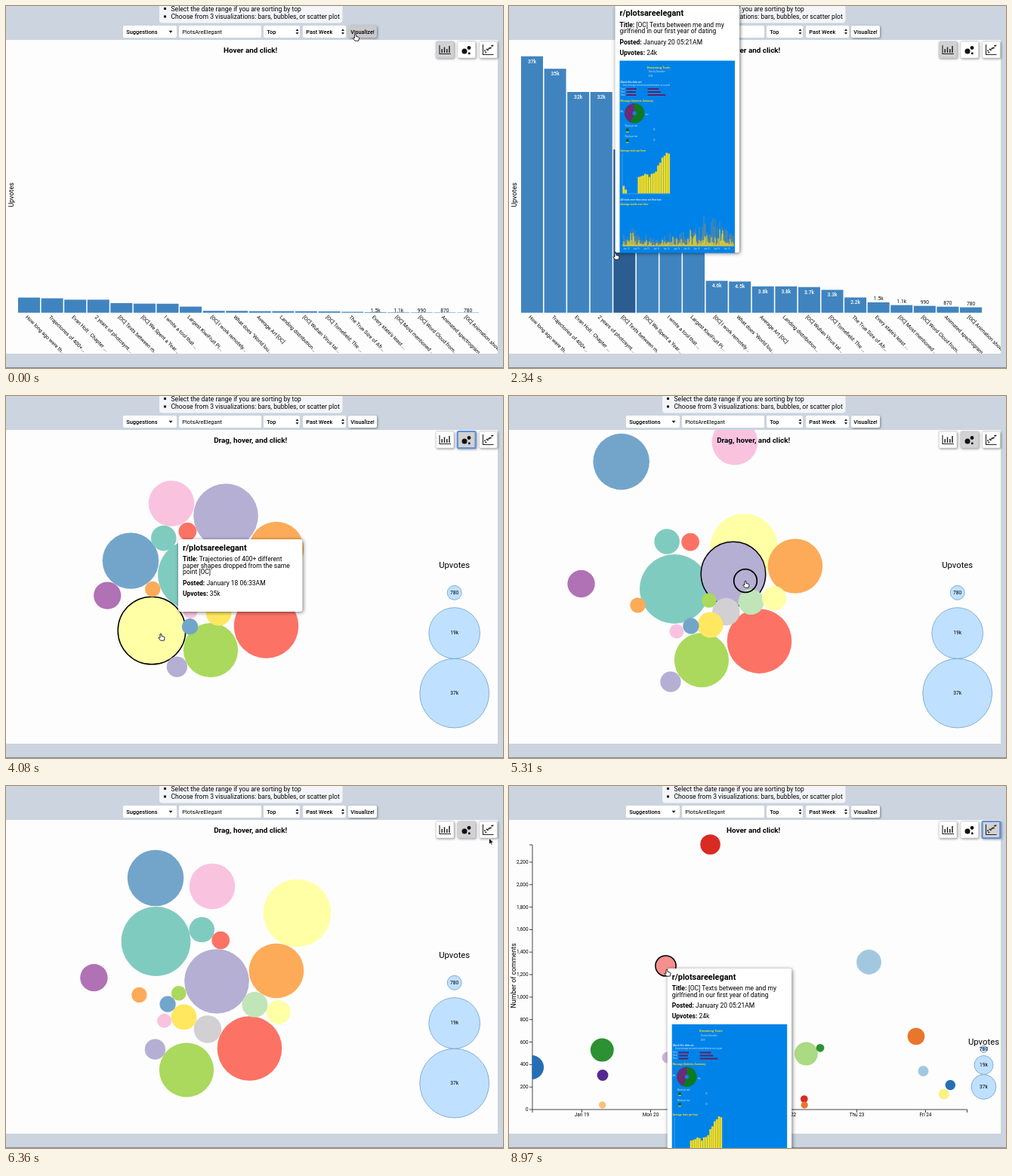
An HTML page for the animation above (9 s loop, 658x480 px).

```html
<!DOCTYPE html>
<html lang="en">
<head>
<meta charset="utf-8">
<title>Post visualizer</title>
<style>
  html, body { margin: 0; width: 100%; height: 100%; overflow: hidden; background: #cbd4df; }
  svg { display: block; width: 658px; height: 480px; font-family: Roboto, "Open Sans", sans-serif; }
  text { dominant-baseline: central; white-space: pre; }
  .bold { font-weight: 700; }
  .soft { filter: drop-shadow(1px 1px 1.5px rgba(0, 0, 0, .4)); }
  .tip { filter: drop-shadow(1px 1px 2.5px rgba(0, 0, 0, .55)); }
</style>
</head>
<body>
<svg id="stage" viewBox="0 0 658 480">
  <clipPath id="panel"><rect y="45" width="651" height="416"/></clipPath>
  <clipPath id="plot"><rect x="30.5" y="45" width="576" height="384"/></clipPath>
</svg>
<script>
const LOOP = 9000, TO_BUBBLES = 2850, TO_SCATTER = 6540, HOVER_LAG = 150;
const stage = document.getElementById('stage');

function el(tag, attrs, parent = stage, content) {
  const node = document.createElementNS('http://www.w3.org/2000/svg', tag);
  set(node, attrs);
  if (content !== undefined) node.textContent = content;
  parent.appendChild(node);
  return node;
}
function set(node, attrs) { for (const k in attrs) node.setAttribute(k, attrs[k]); }
const show = (node, on) => { node.style.display = on ? '' : 'none'; };
const group = (parent, attrs = {}) => el('g', attrs, parent);
const rect = (p, x, y, width, height, fill, more) => el('rect', { x, y, width, height, fill, ...more }, p);
const circle = (p, cx, cy, r, fill, more) => el('circle', { cx, cy, r, fill, ...more }, p);
const path = (p, d, more) => el('path', { d, fill: 'none', ...more }, p);
const text = (p, x, y, size, str, more) => el('text', { x, y, 'font-size': size, ...more }, p, str);
const mid = { 'text-anchor': 'middle' };
const midBold = { ...mid, class: 'bold' };

const clamp = v => Math.max(0, Math.min(1, v));
const mix = (a, b, p) => a + (b - a) * p;
const mixPoint = (a, b, p) => [mix(a[0], b[0], p), mix(a[1], b[1], p)];
const smooth = p => p * p * (3 - 2 * p);
const cubic = p => p < .5 ? 4 * p ** 3 : 1 - 4 * (1 - p) ** 3;
const span = (t, a, b) => clamp((t - a) / (b - a));
const within = (t, [a, b]) => t >= a && t < b;
const inBox = ([x, y], left, top, w, h) => x >= left && x < left + w && y >= top && y < top + h;
const noise = i => { const v = Math.sin(i * 12.9898) * 43758.5453; return v - Math.floor(v); };

// Page chrome
rect(stage, 0, 479, 658, 1, '#858b93');
rect(stage, 203, -10, 242.5, 32.5, '#f4f5f8', { rx: 4 });
['Select the date range if you are sorting by top',
 'Choose from 3 visualizations: bars, bubbles, or scatter plot'].forEach((line, i) => {
  rect(stage, 209, 2 + i * 10.5, 3, 3, '#111');
  text(stage, 218.5, 3.7 + i * 10.5, 8.6, line);
});
function field(x, w, label, weight = 500) {
  rect(stage, x, 26, w, 16, '#fff', { rx: 2 });
  text(stage, x + 4.3, 34.3, 7.4, label, { 'font-weight': weight });
}
field(155, 71, 'Suggestions');
field(229, 109, 'PlotsAreElegant', 400);
field(341, 48, 'Top');
field(393, 57, 'Past Week');
path(stage, 'M215.5 32.8h5l-2.5 3z', { fill: '#111' });
for (const x of [385.5, 446]) path(stage, `M${x - 2} 33l2-2.8 2 2.8zm0 2l2 2.8 2-2.8z`, { fill: '#222' });
const goBox = [453, 26, 38, 16];
const goButton = rect(stage, ...goBox, '#fff', { rx: 2, class: 'soft' });
text(stage, 472, 34.3, 7.3, 'Visualize!', { ...mid, 'font-weight': 500 });
rect(stage, 0, 45, 651, 416, '#fefdfe');

// Pointer route: arrival, departure, x, y
const route = [
  [0, 110, 462.5, 37], [620, 620, 24, 250], [770, 770, 38, 262], [900, 920, 87, 296], [1900, 2560, 141, 327],
  [2760, 2980, 608, 58], [3900, 3900, 228, 287], [4060, 4300, 205, 315], [4850, 4850, 323, 205], [4950, 4950, 307, 168],
  [5310, 5450, 313, 245], [6250, 6400, 639.5, 69], [6520, 6680, 638, 61], [8500, LOOP, 209, 243]
];
function pointerAt(t) {
  const i = route.findLastIndex(k => k[0] <= t);
  const from = route[i], to = route[i + 1] || from;
  return mixPoint(from.slice(2), to.slice(2), smooth(span(t, from[1], to[0])));
}

// Bars
const root = () => group(stage, { 'clip-path': 'url(#panel)' });
const barScene = root(), bubbleScene = root(), scatterScene = root();
const BASE = 406.7, PER_K = 9.19, LEFT = 16, PITCH = 30.58;
const votes = [37, 35.2, 31.85, 31.85, 23.55, 22.2, 21.95, 14.9, 4.6, 4.5, 3.8, 3.8, 3.7, 3.3, 2.2, 1.5, 1.1, .99, .87, .78];
const posts = ['How long ago were th', 'Trajectories of 400+', 'Evan Holt : Chapter ', '2 years of photosynt',
  '[OC] Texts between m', '[OC] We Spent a Year', 'I wrote a tool that ', 'Largest KiwiFruit Pi', '[OC] I work remotely',
  'What does "World lou', 'Average Art [OC]', 'Landing distribution', '[OC] Wuhan Virus tal', '[OC] Tomefield: The ',
  'The True Size of Afr', "Every state's least ", '[OC] Most mentioned ', '[OC] Word Cloud from', 'Animated spectrogram',
  '[OC] Animation shows'];
const short = v => v >= 10 ? Math.round(v) + 'k' : v >= 1 ? v.toFixed(1) + 'k' : String(Math.round(v * 1000));

const bars = votes.map((v, i) => {
  const x = LEFT + i * PITCH, dark = v <= 1.5;
  const post = posts[i].endsWith(']') ? posts[i] : posts[i] + '...';
  text(barScene, 0, 0, 6.8, post, { transform: `translate(${x + 11} 411.5) rotate(45)` });
  return {
    v, x, dark,
    box: rect(barScene, x, 0, 29, 0),
    label: text(barScene, x + 14.5, 0, 6.7, short(v),
      { ...mid, 'font-weight': dark ? 400 : 500, fill: dark ? '#111' : '#fff' })
  };
});
text(barScene, 0, 0, 9, 'Upvotes', { ...mid, transform: 'translate(7 250.5) rotate(-90)' });

function drawBars(t, pointer) {
  const grow = cubic(clamp((t + 183) / 750));
  let hit = false;
  for (const { v, x, dark, box, label } of bars) {
    const h = v * PER_K * grow;
    const hover = inBox(pointer, x, BASE - h, PITCH, h);
    hit ||= hover;
    set(box, { y: BASE - h, height: h, fill: hover ? '#2b5d90' : '#4084bf' });
    set(label, { y: BASE - h + (dark ? mix(-2, -5, grow) : 7), opacity: dark ? 1 : clamp((grow - .06) * 4) });
  }
  return hit;
}

// Outlines the topmost disc under the pointer
function outline(discs, [x, y]) {
  const hit = discs.findLast(d => Math.hypot(x - d.x, y - d.y) < d.r);
  discs.forEach(d => set(d.node, { stroke: d === hit ? '#000' : 'none', 'stroke-width': 1.5 }));
  return Boolean(hit);
}

// Bubbles: each large one passes through three points
const soft = ['#80cbc0', '#ffffa6', '#b5afd4', '#fc7365', '#73a5cb', '#fdab58',
  '#aad95d', '#f9c3e0', '#d2d0d3', '#b171b5', '#bfe5b8', '#ffe85f'];
const large = [
  [[247, 237], [219, 256], [198.5, 206]],
  [[193, 311], [311, 201], [385.5, 168.5]],
  [[291, 159], [297, 236], [279, 259]],
  [[344.5, 305], [331.5, 325], [322.5, 348]],
  [[165, 218.5], [148.5, 87], [198, 122]],
  [[358, 203], [379, 225.5], [358, 245]],
  [[271, 337], [255, 350], [239, 376.5]],
  [[219, 142.5], [299, 61], [273, 133]]
];
// Small ones have one home, and are pulled to a centre and pushed off their neighbours
const homes = [[287.5, 286], [95.5, 249], [320.5, 273], [266.5, 303.5], [209, 193], [351, 268],
  [214, 379], [240, 193.5], [241, 305], [170.5, 277.5], [265, 271], [222, 312]];
const bubbleSize = v => 3.3 + 7 * Math.sqrt(v);
const sizes = votes.map(bubbleSize);

function pack(k, centre, pull) {
  const spots = [...large.map(p => [...p[k]]), ...homes.map(h => mixPoint(h, centre, pull))];
  if (!pull) return spots;
  for (let round = 0; round < 60; round++) {
    for (let i = large.length; i < spots.length; i++) {
      for (let j = 0; j < i; j++) {
        const a = spots[i], b = spots[j];
        const dx = a[0] - b[0], dy = a[1] - b[1], gap = Math.hypot(dx, dy) || 1;
        const push = Math.max(0, sizes[i] + sizes[j] - gap) / gap;
        const share = j < large.length ? 1 : .5;
        a[0] += dx * push * share;
        a[1] += dy * push * share;
        b[0] -= dx * push * (1 - share);
        b[1] -= dy * push * (1 - share);
      }
    }
  }
  return spots;
}
const poses = [pack(0, [262, 245], .3), pack(1, [0, 0], 0), pack(2, [200, 275], .2)];
const drags = { 1: [4300, 4850], 2: [4950, 5310] };
const bubbles = sizes.map((r, i) => ({ i, r, node: circle(bubbleScene, 0, 0, r, soft[i % soft.length]) }));

function drawBubbles(t, pointer) {
  const gather = .9 * Math.exp(-(t - TO_BUBBLES) / 140);
  const settle = 1 - (1 - span(t, 5310, 6280)) ** 3;
  for (const b of bubbles) {
    const move = smooth(span(t, ...(drags[b.i] || [4300, 5310])));
    const [x, y] = mixPoint(mixPoint(poses[0][b.i], poses[1][b.i], move), poses[2][b.i], settle);
    b.x = x + (x - 262) * gather;
    b.y = y + (y - 245) * gather;
    set(b.node, { cx: b.x, cy: b.y });
  }
  return outline(bubbles, pointer);
}

function legend(p, x, titleY, bottom, size) {
  let y = bottom;
  const ring = (v, gap) => {
    const r = size(v);
    y -= r;
    circle(p, x, y, r, '#bfe1ff', { stroke: '#6f9fc6', 'stroke-width': .8 });
    text(p, x, y, 6.7, short(v), mid);
    y -= r + gap;
  };
  ring(37, 0);
  ring(19, size(1));
  ring(.78, 0);
  text(p, x, titleY, 11.3, 'Upvotes', mid);
}
legend(bubbleScene, 593.7, 224.5, 440, bubbleSize);

// Scatter plot
const line = { stroke: '#333', 'stroke-width': .9 };
path(scatterScene, 'M27 78h4V429H606.5v4M31 429v4', line);
for (let n = 0; n <= 2200; n += 200) {
  const y = 429 - n * .1491;
  path(scatterScene, `M27 ${y}h4`, line);
  text(scatterScene, 25.5, y, 6.4, n.toLocaleString('en-US'), { 'text-anchor': 'end' });
}
['Jan 19', 'Mon 20', 'Tue 21', 'Wed 22', 'Thu 23', 'Fri 24'].forEach((day, i) => {
  const x = 96.5 + i * 91;
  path(scatterScene, `M${x} 429v4`, line);
  text(scatterScene, x, 436.3, 6.4, day, mid);
});
text(scatterScene, 0, 0, 8.8, 'Number of comments', { ...mid, transform: 'translate(6 251.5) rotate(-90)' });
const plot = group(scatterScene, { 'clip-path': 'url(#plot)' });
const vivid = ['#a2c8e0', '#246fb4', '#aada82', '#2c9132', '#f5908e', '#d92a24',
  '#fdbf73', '#e8762c', '#cbb3da', '#552a93', '#fbf284', '#b15928'];
// Place of each post by its rank
const places = {
  0: [476.5, 233.5], 1: [30, 373], 2: [393.5, 355], 3: [123.3, 350], 4: [207.5, 238.5], 5: [266.5, 77.5],
  7: [539, 332], 8: [210, 360], 9: [124, 383.5], 10: [575.7, 408.5], 12: [548.5, 378], 13: [584.3, 396.5],
  15: [412, 347.3], 17: [390.8, 415], 18: [123.7, 423], 19: [391.2, 423]
};
const dotSize = v => 2.6 + 2.27 * Math.sqrt(v);
const dots = Object.entries(places).map(([rank, [x, y]]) =>
  ({ x, y, r: dotSize(votes[rank]), node: circle(plot, x, y, 0, vivid[rank % vivid.length]) }));
legend(scatterScene, 628.5, 339, 415.3, v => v === 1 ? 4 : dotSize(v));

function drawScatter(t, pointer) {
  const grow = cubic(span(t, TO_SCATTER, TO_SCATTER + 500));
  dots.forEach(d => set(d.node, { r: d.r * grow }));
  return outline(dots, pointer);
}

const heading = text(stage, 323.7, 58, 9.9, '', midBold);

// View switch
const modeBoxes = [569.2, 597.8, 626.5].map(x => [x, 47, 23.8, 22]);
const modes = modeBoxes.map(box => rect(stage, ...box, '#fff', { rx: 1.5, class: 'soft' }));
const ink = { stroke: '#222', 'stroke-width': 1.1 };
path(stage, 'M574 52V63.5H589', ink);
path(stage, 'M577.2 62V57M580.5 62V54.5M583.8 62V57M587 62V53', { ...ink, 'stroke-width': 1.5 });
circle(stage, 607, 60, 3.5, '#111');
circle(stage, 613, 55.5, 2.4, '#111');
circle(stage, 613.3, 62.8, 1.5, '#111');
path(stage, 'M631.5 51V64.5H645.5', ink);
for (let i = 0; i < 9; i++) circle(stage, 634 + i * 1.3, 61 - i + 3.5 * (noise(i) - .5), 1, '#222');

// Infographic inside a tooltip
function poster(p) {
  const yellow = '#f5dc1e', pale = '#d5e7f8';
  const head = (y, s, fill = yellow) => text(p, 1, y, 3.3, s, { fill, class: 'bold' });
  const note = (x, y, s) => text(p, x, y, 2.6, s, { fill: pale });
  rect(p, 0, 0, 152.5, 255, '#0083e8');
  text(p, 51.5, 8.5, 4.2, 'Streaming Texts', { ...midBold, fill: yellow });
  note(38, 15, 'Texts by December');
  note(38, 21, '2019');
  head(28, 'About this data set', pale);
  note(4, 32.5, 'Every message sent and received between us in a year');
  for (let i = 0; i < 3; i++) {
    const y = 36.5 + i * 4;
    note(1, y + 1, 'Total');
    rect(p, 9, y, 10 + 6 * noise(i + 3), 2, '#5a2468');
    rect(p, 37, y, 10 + 14 * noise(i + 8), 2, '#5a2468');
  }
  head(53, 'Message Statistics Summary');
  circle(p, 19.7, 69.7, 13.2, '#0d7a22');
  path(p, 'M19.7 56.5A13.2 13.2 0 0 0 14.5 81.8L19.7 69.7z', { fill: '#6d2a78' });
  circle(p, 19.7, 69.7, 2.6, '#1683d4');
  note(1, 68, 'Me');
  note(34, 72, 'Her');
  for (const y of [87, 101]) {
    note(7, y, 'Words per text');
    rect(p, 8.5, y + 3, 3.5, 3.5, '#0d5f2a');
    rect(p, 8.5, y + 7, 3.5, 1, yellow);
    note(44, y + 5, '12');
  }
  head(119.5, 'Average texts per hour');
  for (let i = 0; i < 22; i++) {
    const h = i < 7 ? Math.max(0, 10 - 5 * i) : 21 + 5 * noise(i) + 29 * smooth(span(i, 13, 20));
    rect(p, 4 + i * 2.85, 176 - h, 2.6, h, yellow);
  }
  path(p, 'M3.5 123V176.5H67', { stroke: '#9cc9ee', 'stroke-width': .4 });
  head(184, 'All texts over time since we first met', pale);
  head(190, 'Average words over time');
  let back = '', front = '';
  for (let i = 0; i < 147; i++) {
    const swell = 9 + 11 * Math.exp(-(((i - 108) / 32) ** 2)) + 4 * Math.sin(i / 9);
    const h = 2 + swell * (.35 + noise(i) ** 2 * 1.3) + 25 * Math.exp(-((i - 107) ** 2));
    back += `M${4.5 + i} 246v${-h}`;
    front += `M${4.5 + i} 246v${-h * (.15 + .75 * noise(i + 500) ** 2)}`;
  }
  path(p, back, { stroke: '#75868a' });
  path(p, front, { stroke: yellow });
  for (let i = 0; i < 11; i++) note(5 + i * 13.3, 249.5, 'Jan 19');
}

function tooltip(lines, posted, upvotes, picture) {
  const g = group(stage);
  const endY = 26 + (lines.length - 1) * 8.7;
  rect(g, 0, 0, 164.5, picture ? 328.5 : 96, '#fff', { rx: 3, class: 'tip' });
  text(g, 6, 11, 10.9, 'r/plotsareelegant', { class: 'bold' });
  const row = (y, name, value) => {
    const node = text(g, 6, y, 8.5, '');
    el('tspan', { class: 'bold' }, node, name + ': ');
    el('tspan', {}, node, value);
  };
  row(26, 'Title', lines[0]);
  lines.slice(1).forEach((s, i) => text(g, 6, 34.7 + i * 8.7, 8.5, s));
  row(endY + 14.3, 'Posted', posted);
  row(endY + 28.3, 'Upvotes', upvotes);
  if (picture) poster(group(g, { transform: 'translate(6 74)' }));
  return g;
}
const shapesTip = tooltip(['Trajectories of 400+ different', 'paper shapes dropped from the same', 'point [OC]'],
  'January 18 06:33AM', '35k');
const textsTip = tooltip(['[OC] Texts between me and my', 'girlfriend in our first year of dating'],
  'January 20 05:21AM', '24k', true);
const tips = [
  { when: [780, 1150], node: shapesTip, at: [59, 177.3] },
  { when: [1880, 2620], node: textsTip, at: [140.5, -1.5] },
  { when: [3900, 4300], node: shapesTip, at: [228, 190] },
  { when: [8500, LOOP], node: textsTip, at: [209.7, 242] }
];

// Pointer
const ring = circle(stage, 0, 0, 15.3, 'none', { stroke: '#000', 'stroke-width': 1.7 });
const cursor = group(stage);
const hand = path(cursor, 'M-1 1Q0-1 1 1V3.4L4 4.2Q5.2 4.6 5 6L4.2 9.2H-.4L-3.2 5.8Q-2.8 4.4-1 5.6z',
  { fill: '#fff', stroke: '#111', 'stroke-width': .9, 'stroke-linejoin': 'round' });
const arrow = path(cursor, 'M0 0V8.2L1.9 6.5 3.2 9.3 4.6 8.7 3.4 6H6z', { fill: '#111', stroke: '#fff', 'stroke-width': .7 });

function drawPointer(t, point, overItem) {
  const overGo = inBox(point, ...goBox);
  const active = overItem || overGo || modeBoxes.some(box => inBox(point, ...box));
  set(cursor, { transform: `translate(${point})` });
  show(hand, active);
  show(arrow, !active);
  set(ring, { cx: point[0], cy: point[1] });
  show(ring, Object.values(drags).some(([a, b]) => within(t, [a, b + 100])));
  set(goButton, { fill: overGo ? '#c9c8ca' : '#fff' });
}

const scenes = [[barScene, drawBars], [bubbleScene, drawBubbles], [scatterScene, drawScatter]];
function draw(t) {
  const mode = t < TO_BUBBLES ? 0 : t < TO_SCATTER ? 1 : 2;
  scenes.forEach(([node], i) => show(node, i === mode));
  const overItem = scenes[mode][1](t, pointerAt(Math.max(0, t - HOVER_LAG)));
  heading.textContent = mode === 1 ? 'Drag, hover, and click!' : 'Hover and click!';
  const focused = mode === 2 || within(t, [TO_BUBBLES, 4300]);
  modes.forEach((node, i) => {
    const ringed = i === mode && focused;
    set(node, {
      fill: i === mode ? '#d2d1d3' : '#fff',
      stroke: ringed ? '#5b92dc' : '#c4c4c8',
      'stroke-width': ringed ? 2.2 : .6
    });
  });
  const tip = tips.find(s => within(t, s.when));
  for (const node of [shapesTip, textsTip]) show(node, tip && tip.node === node);
  if (tip) set(tip.node, { transform: `translate(${tip.at})` });
  drawPointer(t, pointerAt(t), overItem);
}

const start = performance.now();
function tick() {
  draw((performance.now() - start) % LOOP);
  requestAnimationFrame(tick);
}
tick();
</script>
</body>
</html>
```
